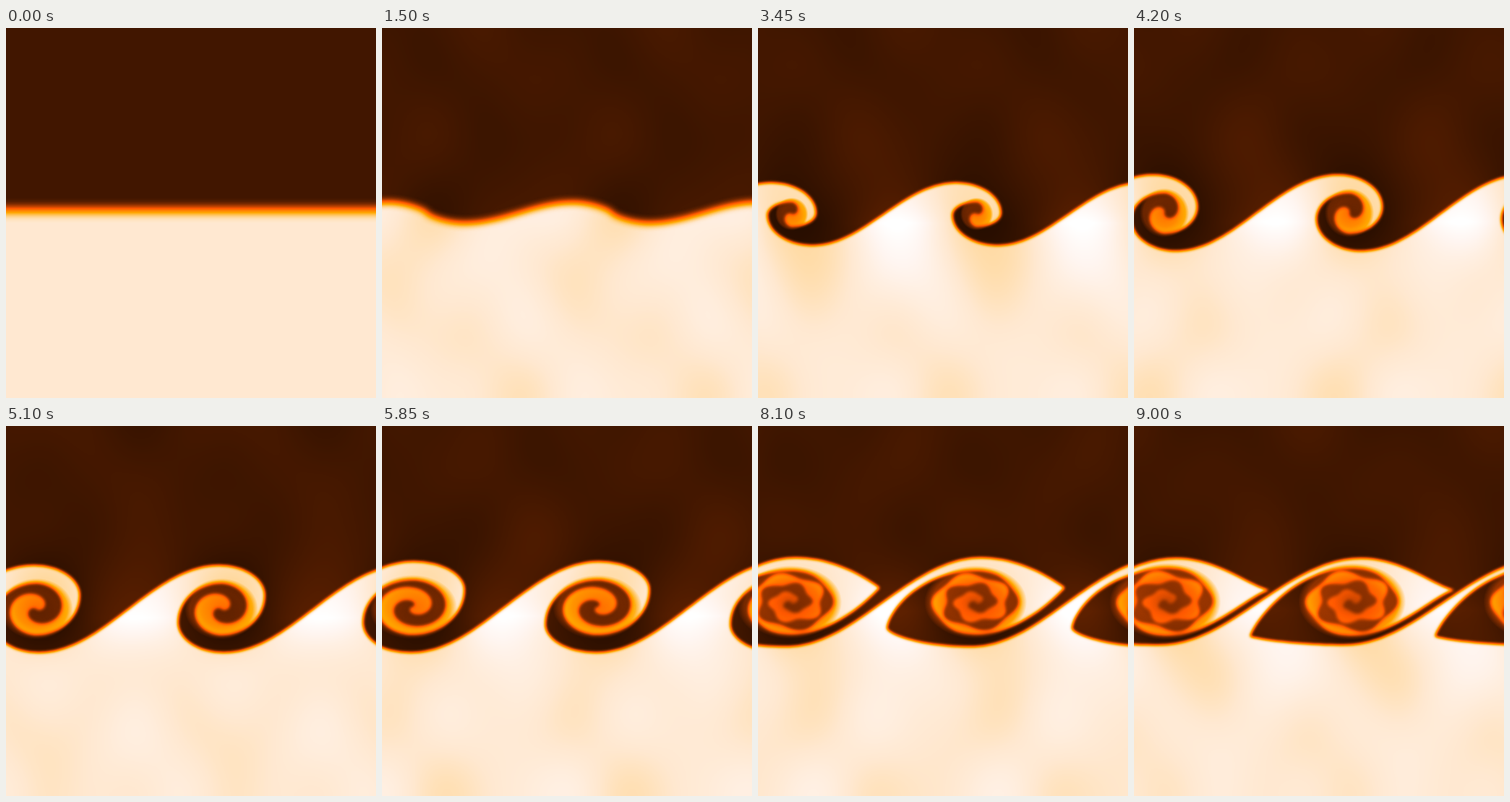
Animation of 512 by 512 pixels, one loop 9.15 s. Source, as an HTML page with a canvas:

```html
<!DOCTYPE html>
<html lang="en">
<head>
<meta charset="utf-8">
<title>Shear layer roll-up</title>
<style>
html, body { margin: 0; width: 100%; height: 100%; overflow: hidden; background: #401600; }
canvas { display: block; width: 512px; height: 512px; }
</style>
</head>
<body>
<canvas id="stage" width="512" height="512"></canvas>
<script>
const SIZE = 512, PERIOD = 256, PAD = 32, STEP = 150, STEPS = 61;
const DARK = 0.1, LIGHT = 0.9, TAU = 2 * Math.PI;
const { sin, cos, exp, min, max, round } = Math;
const grey = (v, alpha = 1) => {
  const c = round(v * 255);
  return `rgba(${c},${c},${c},${alpha})`;
};
const ease = (t, from, to) => {
  const f = min(1, max(0, (t - from) / (to - from)));
  return f * f * (3 - 2 * f);
};

// Colour ramp for density
const stops = [[0, 0, 0, 0], [0.4, 255, 88, 0], [0.65, 255, 168, 0],
  [0.9, 255, 232, 208], [0.96, 255, 245, 240], [1, 255, 255, 255]];
const ramp = Array.from({ length: 1024 }, (_, i) => {
  const v = i / 1023;
  let s = 0;
  while (s < stops.length - 2 && v > stops[s + 1][0]) s++;
  const a = stops[s], b = stops[s + 1], f = (v - a[0]) / (b[0] - a[0]);
  return [1, 2, 3].map(c => a[c] + (b[c] - a[c]) * f);
});

// How the billow grows: t counts steps
function billow(t) {
  const late = ease(t, 48, 60);
  const tipY = -24 * ease(t, 20, 40) + 8 * late;
  return {
    cx: 318 - 20 * ease(t, 12, 28) + 4 * ease(t, 40, 60),
    cy: 252 + 6 * ease(t, 0, 18) - 15 * ease(t, 18, 60),
    blur: 7.5 - 5.2 * ease(t, 0, 22),
    height: 63 * sin(TAU / 4 * min(1, t / 40)) ** 1.55 - 3 * late,
    crest: -54 + 56 * ease(t, 8, 40) + 10 * late,
    reach: max(0, 2.4 * (t - 9)) + 19 * ease(t, 40, 60),
    eye: 34 * ease(t, 12, 34) + 0.4 * max(0, t - 30),
    aspect: 1 + 0.4 * ease(t, 28, 40),
    turn: 1.4 + 11 * ease(t, 17, 58),
    wobble: 0.13 * ease(t, 40, 58),
    mix: 0.5 * ease(t, 12, 24) + 0.22 * ease(t, 36, 60),
    light: { y: tipY, pinch: 2 - ease(t, 8, 18) + 2 * ease(t, 46, 62) },
    dark: { y: tipY - 32 * late, pinch: 2 - ease(t, 8, 18) + 0.6 * late }
  };
}

// One arm of the interface, from the saddle over the crest and round into the core
function arm(b, tip) {
  const pts = [], half = PERIOD / 2, bend = 24, coil = 180;
  for (let i = 0; i < bend; i++) {
    const f = i / bend;
    pts.push([-half + (b.crest + half) * f, -b.height * sin(f * TAU / 4)]);
  }
  for (let i = 0; i < bend; i++) {
    const a = i / bend * TAU / 4;
    pts.push([b.crest + (b.reach - b.crest) * sin(a),
      tip.y - (b.height + tip.y) * cos(a) ** tip.pinch]);
  }
  for (let i = 0; i < bend; i++) {
    const a = i / bend * TAU / 4;
    pts.push([b.reach * cos(a), tip.y + (b.eye - tip.y) * sin(a) ** tip.pinch]);
  }
  for (let i = 0; i <= coil; i++) {
    const p = i / coil, a = b.turn * p;
    const r = b.eye * (1 - p ** 1.4) * (1 + b.wobble * sin(5 * a) * sin(p * TAU / 2));
    pts.push([-b.aspect * r * sin(a), r * cos(a)]);
  }
  return pts;
}

const stage = document.getElementById("stage").getContext("2d");
const work = document.createElement("canvas");
work.width = work.height = SIZE + 2 * PAD;
const field = work.getContext("2d", { willReadFrequently: true });
field.translate(PAD, PAD);
const image = stage.createImageData(SIZE, SIZE);

function drawField(b) {
  // The dark arm is the light one turned half round
  const back = arm(b, b.dark).reverse().map(([x, y]) => [-x, -y]);
  const tile = arm(b, b.light).concat(back);
  field.fillStyle = grey(DARK);
  field.fillRect(-PAD, -PAD, work.width, work.height);
  field.filter = `blur(${b.blur}px)`;
  field.fillStyle = grey(LIGHT);
  field.beginPath();
  field.moveTo(-800, SIZE + 90);
  for (let k = -2; k <= 2; k++)
    for (const [x, y] of tile) field.lineTo(b.cx + x + k * PERIOD, b.cy + y);
  field.lineTo(1300, SIZE + 90);
  field.fill();
  field.filter = "none";

  // Mixed fluid in the core
  const radius = b.eye * 1.05 + 5;
  for (let k = -2; k <= 1; k++) {
    field.save();
    field.translate(b.cx + k * PERIOD, b.cy);
    field.scale(b.aspect, 1);
    const g = field.createRadialGradient(0, 0, 0, 0, 0, radius);
    g.addColorStop(0, grey(0.28, b.mix * 1.2));
    g.addColorStop(0.55, grey(0.33, b.mix));
    g.addColorStop(0.85, grey(0.36, b.mix * 0.7));
    g.addColorStop(1, grey(0.36, 0));
    field.fillStyle = g;
    field.fillRect(-radius, -radius, 2 * radius, 2 * radius);
    field.restore();
  }
}

// Sound waves: count across, vertical wave number, speed, strength
const waves = [[1, 0.018, 0.17, 0.02], [1, 0.035, -0.31, 0.013], [2, 0.025, 0.23, 0.009]];

function paint(t) {
  const b = billow(t);
  drawField(b);
  const src = field.getImageData(PAD, PAD, SIZE, SIZE).data, out = image.data;
  const grow = min(1, t / 20) ** 2, sound = min(1, t / 9);
  const across = Array.from({ length: PERIOD }, (_, x) => {
    const d = ((x - b.cx) % PERIOD + 1.5 * PERIOD) % PERIOD - PERIOD / 2;
    return {
      squeeze: cos(TAU * (d + 115) / PERIOD) + 0.35,
      dip: exp(-d * d / 4600),
      wave: waves.map(([n, , speed]) => cos(TAU * n * x / PERIOD - speed * t + n))
    };
  });
  for (let y = 0; y < SIZE; y++) {
    const dy = y - b.cy;
    const squeeze = 0.085 * grow * exp(-Math.abs(dy - 12) / 65);
    const dip = 0.03 * grow * exp(-dy * dy / 4600);
    const wave = waves.map(([, q, , amp]) => amp * sound * cos(q * (SIZE - y)));
    for (let x = 0; x < SIZE; x++) {
      const i = (y * SIZE + x) * 4, c = across[x % PERIOD], v = src[i] / 255;
      const push = wave.reduce((sum, w, n) => sum + w * c.wave[n], squeeze * c.squeeze);
      const density = v + push * (0.3 + 0.7 * v) - dip * c.dip;
      const rgb = ramp[max(0, min(1023, round(density * 1023)))];
      out[i] = rgb[0];
      out[i + 1] = rgb[1];
      out[i + 2] = rgb[2];
      out[i + 3] = 255;
    }
  }
  stage.putImageData(image, 0, 0);
}

const start = performance.now();
let shown = -1;
function tick() {
  const step = Math.floor((performance.now() - start) / STEP) % STEPS;
  if (step !== shown) paint(shown = step);
  requestAnimationFrame(tick);
}
tick();
</script>
</body>
</html>
```
